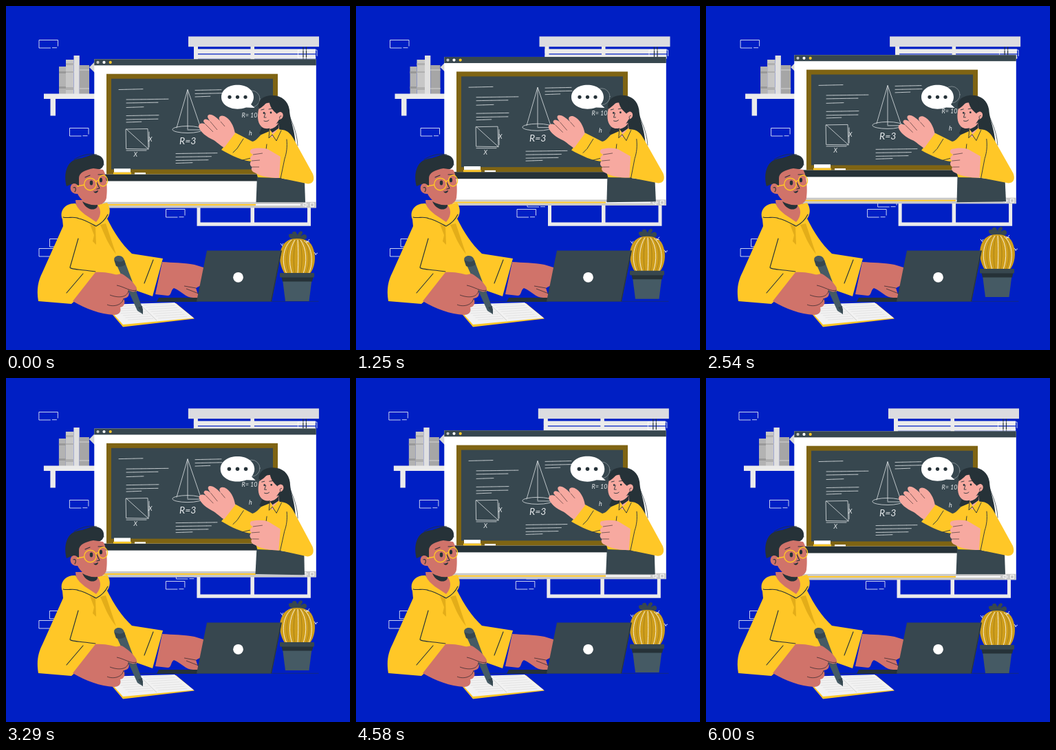
Recreate the animation shown at these times as an HTML page. Size 500 by 500 pixels, loop 6.04 s.

```html
<!DOCTYPE html>
<html lang="en">
<head>
<meta charset="utf-8">
<title>Online lesson</title>
<style>
  html, body { margin: 0; width: 100%; height: 100%; overflow: hidden; background: #001fc4; }
  svg { display: block; width: 100%; height: 100%; }
  .ink { fill: none; stroke: #263238; stroke-linecap: round; stroke-linejoin: round; }
  .chalk { fill: none; stroke: #dfe4e6; stroke-width: .8; stroke-linecap: round; }
  .rough { stroke-dasharray: 7 .7 3 .4; }
  .letters { fill: #e6eaec; font-family: Lato, "Open Sans", sans-serif; font-style: italic; }
  .brick { fill: none; stroke: #fff; stroke-width: .8; }
</style>
</head>
<body>
<svg viewBox="0 0 500 500">
  <rect width="500" height="500" fill="#001fc4"/>

  <g id="room">
    <g fill="#ebebeb">
      <path d="M273 62.500H450V69.200H273ZM273 70.600H450V76.800H273Z"/>
      <path d="M273 59H279V80H273ZM355.500 59H361V80H355.500Z"/>
      <path d="M277.500 270H282.500V314.500H355.500V270H361V314.500H438V270H443V319.800H277.500Z"/>
    </g>
    <path d="M432 59V78M436.500 59V78" class="ink" stroke-width="1.200"/>
    <rect x="265" y="44.300" width="190" height="14.900" fill="#dcdce0"/>
    <g id="bricks"></g>
    <g>
      <path d="M77 88H87V128H77Z" fill="#b3b3b3"/>
      <path d="M77 95H87V98H77ZM77 117H87V120H77Z" fill="#999"/>
      <path d="M87 78H98.500V128H87Z" fill="#c7c7c7"/>
      <path d="M87 83H98.500V86H87ZM87 95H98.500V97H87ZM87 118H98.500V122H87Z" fill="#b0b0b0"/>
      <path d="M98.500 72H106.800V128H98.500Z" fill="#e0e0e0"/>
      <path d="M106.800 86H121V128H106.800Z" fill="#a6a6a6"/>
      <path d="M106.800 92H121V94H106.800ZM106.800 119H121V121H106.800Z" fill="#bdbdbd"/>
      <path d="M121 89L128 82L136 90L130 98Z" fill="#d6d6d6"/>
    </g>
    <path d="M55 127.500H132V135H72V159.500H64.500V135H55Z" fill="#ebebeb"/>
  </g>

  <g id="screen">
    <rect x="128.300" y="77.300" width="322.500" height="216" fill="#fff"/>
    <rect x="128.300" y="77.300" width="322.500" height="9" fill="#37474f"/>
    <circle cx="133.500" cy="81.900" r="2.100" fill="#c7c7c7"/>
    <circle cx="142.500" cy="81.900" r="2.100" fill="#fff"/>
    <circle cx="151.700" cy="81.900" r="2.100" fill="#ffc727"/>
    <rect x="128.300" y="284.800" width="322.500" height="8.500" fill="#c9c9c9"/>
    <rect x="134" y="287.900" width="294" height="2" fill="#fff"/>
    <rect x="134" y="287.900" width="229" height="2" fill="#ffc727"/>
    <path d="M432 287.500H434L436 286V292L434 290.500H432ZM438 287.500V290.500M442.500 286.500H447.500V291.500H442.500Z" fill="none" stroke="#fff" stroke-width=".9"/>
    <rect x="139" y="244.500" width="262" height="10" fill="#263238"/>
    <rect x="146" y="98.700" width="249" height="145.800" fill="#7f6413"/>
    <rect x="153" y="105.700" width="235" height="131.800" fill="#37474f"/>
    <rect x="157" y="236.300" width="24" height="5.500" fill="#fff"/>
    <rect x="156" y="241.800" width="26" height="2.700" fill="#ffc727"/>
    <rect x="187" y="242.200" width="16" height="2.300" fill="#fff"/>
    <g id="notes" class="chalk rough"></g>
    <g class="chalk">
      <path d="M174.500 179L206 178.500L207 208L175 207.500ZM175 179L207 208M175 210H204M208 183V205"/>
      <path d="M248 177L264 121.500L283 177M264 122V179"/>
      <ellipse cx="264" cy="179.500" rx="22" ry="5"/>
      <path d="M264 180H284"/>
      <circle cx="357" cy="135" r="12" opacity=".5"/>
    </g>
    <g class="letters">
      <text x="207" y="196.500" font-size="9">X</text>
      <text x="185.500" y="219" font-size="9">X</text>
      <text x="252" y="200.500" font-size="14">R=3</text>
      <text x="342.500" y="162" font-size="9">R= 10</text>
      <text x="353" y="187.500" font-size="9">h</text>
    </g>
  </g>

  <g id="teacher">
    <path d="M367 149C365 137 374 130 387 130C401 130 410 138 412 151C413 169 421 181 421 207L385 196L368 185C371 180 373 174 373 165Z" fill="#263238"/>
    <path d="M408 149C413 165 423 180 424 203" class="ink" stroke-width=".7"/>
    <path d="M365 246L434 255L435 285.200H363.500Z" fill="#37474f"/>
    <path d="M371 187L390 179L402 180C410 181 415 187 419 195L446 244C449 252 447 258 439 258.500L398 250L366 249L359 226C345 226 327 217 313 209L333 184L358 197C364 196 367 190 371 187Z" fill="#ffc727"/>
    <path d="M384 175L396 170L397 181L387 192L382 184Z" fill="#f7a9a0"/>
    <path d="M383 179C390 178 394 174 396 170L396 178L387 184Z" fill="#263238"/>
    <path d="M368 147C365 158 365 169 371 175C377 181 388 178 393 171L397 165C404 165 405 154 398 154L394 156L388 141C381 139 373 143 368 147Z" fill="#f7a9a0"/>
    <path d="M367 150C373 147 379 141 382 135C383 147 388 152 394 157L398 140L385 131L372 135Z" fill="#263238"/>
    <path d="M383 179L382 192L387 187L393 196L399 181L396 178L388 187Z" fill="#ffc727"/>
    <g class="ink" stroke-width=".9">
      <path d="M383 180L382 192L387 187L393 196L400 181M379 201L378 209M400 160C398 159 397 162 398 164"/>
      <path d="M371 151L375 150M382 150L388 149M377 156L375 162L378 162M375 167C377 168 380 168 382 166"/>
      <path d="M345 193L336 207L330 213M408 194C409 205 408 213 405 222L399 251M344 224L360 220"/>
    </g>
    <circle cx="375" cy="155.500" r="1.400" fill="#263238"/>
    <circle cx="385" cy="155" r="1.400" fill="#263238"/>
    <path d="M333 185C331 174 326 164 317 160C311 158 307 162 312 168C306 162 300 157 295 158C291 160 294 164 297 168C291 163 287 164 287 168L290 172C284 169 280 171 280 175C282 183 291 190 302 195C308 199 313 204 317 206Z" fill="#f7a9a0"/>
    <path d="M399 219L382 209C377 206 365 206 357 208C353 210 355 215 359 216C354 219 354 223 357 225C353 228 355 233 358 234C355 237 358 241 361 242C371 248 384 250 397 250Z" fill="#f7a9a0"/>
    <path d="M297 168L307 180M290 172L301 183M312 168L318 175M359 216L373 214M357 225L369 224M358 234L368 234" fill="none" stroke="#4d3838" stroke-width=".7"/>
  </g>

  <g id="bubble">
    <path d="M336.500 114.800C350 114.800 360 122 360 132.500C360 137 358 140 356 143L361.500 148L349 147.500C330 154 313 145 313 132.500C313 122 323 114.800 336.500 114.800Z" fill="#fff"/>
    <g fill="#263238"><circle cx="325" cy="132.300" r="2.600"/><circle cx="336.500" cy="132.300" r="2.600"/><circle cx="348" cy="132.300" r="2.600"/></g>
  </g>

  <path d="M47 429.300H454" class="ink" stroke-width=".5"/>

  <g id="plant">
    <path d="M423 339C414 340 410 336 411 332C415 330 419 331 421 334C413 331 416 327 421 328L424 333C425 327 431 325 431 330L428 335C434 329 438 333 437 337C434 341 428 340 423 339Z" fill="#37474f"/>
    <path d="M406 390C398 380 396 364 400 353C404 342 412 338 423 338C436 338 444 343 447 354C451 365 449 381 441 390Z" fill="#cf9e1c"/>
    <path d="M408 389C400 374 402 350 415 340M416 389C410 373 412 352 420 340M424 389C425 373 425 354 424 340M432 389C438 373 437 352 428 340M440 389C447 374 446 351 433 341" fill="none" stroke="#fff" stroke-width=".8"/>
    <path d="M412 389C405 372 408 350 417 340M420 389C417 372 418 350 422 340M428 389C431 374 431 352 426 340M436 389C443 373 442 351 431 340" fill="none" stroke="#7f6413" stroke-width=".5"/>
    <path d="M402 349L399 345M401 348L403 345M437 344L441 339M436 342L441 343M449 361L453 359M448 358L451 362" stroke="#fff" stroke-width=".8"/>
    <path d="M401.500 394H445L440.500 429H406Z" fill="#455a64"/>
    <path d="M400 392H447L445 400.500H402Z" fill="#263238"/>
    <rect x="398" y="388" width="50" height="6.500" rx="1" fill="#37474f"/>
  </g>

  <g id="student">
    <path d="M145 437L247 432L274 454.500L170 466.500Z" fill="#ffc727"/>
    <path d="M144 434L245 431L273 453.500L170 463Z" fill="#f2f2f2"/>
    <path d="M194 433L219 457" stroke="#d0d0d0"/>
    <g id="writing" fill="none" stroke="#d9d9d9" stroke-width=".6"></g>

    <path d="M101 282H140V322H105Z" fill="#d0736a"/>
    <path d="M82 310C77 298 86 286 101 287C107 301 122 307 131 314C137 307 140 298 133 289L147 286C153 295 151 304 147 309C157 329 168 346 183 360L228 367L213 422L179 410L145 390L95 433L47 429C44 411 47 399 53 387L83 320Z" fill="#ffc727"/>
    <path d="M122 317L128 333L126 342L131 347L130 320ZM137 318C143 331 147 345 160 361L153 340L145 316Z" fill="#e3ad19"/>
    <g class="ink" stroke-width="1.100">
      <path d="M83 307C91 309 99 305 106 309C115 311 123 316 131 320C139 316 145 309 148 303"/>
      <path d="M105 338L93 380C94 383 108 383 130 386M112 389L88 417M214 369L201 403"/>
    </g>

    <path d="M227 372C242 373 258 373 274 376L287 380V404L276 410L281 425L272 424C261 424 255 414 244 410C239 413 241 421 235 421L217 419Z" fill="#d0736a"/>
    <path d="M276 410L259 407M280 418L262 411" fill="none" stroke="#3b2d31" stroke-width=".8"/>

    <path d="M88 262C84 247 87 231 97 225C105 220 112 222 118 219C127 213 141 216 142 226C143 234 138 238 132 238L110 254L106 264L95 259Z" fill="#263238"/>
    <path d="M112 221C125 215 141 218 142 231M99 223C111 216 122 214 132 216" class="ink" stroke-width=".8"/>
    <path d="M106 250C106 242 116 238 127 236L141 238C146 244 148 265 146 279C144 288 135 290 126 289C116 288 108 281 104 273C96 274 91 266 95 260C99 256 103 259 106 262Z" fill="#d0736a"/>
    <path d="M111 284C118 288 125 290 133 289C134 298 117 299 111 284Z" fill="#263238"/>
    <path d="M98 264C102 262 102 268 100 270M115 249L122 246M134 245L141 245M132 257L136 265L132 266" class="ink" stroke-width="1.100"/>
    <ellipse cx="124" cy="257" rx="2.300" ry="3.400" fill="#263238"/>
    <ellipse cx="138" cy="253" rx="2.100" ry="3.200" fill="#263238"/>
    <path d="M127 269.500C130 270 132 269 134 268C134 271 130 274 127 269.500Z" fill="#263238"/>
    <g fill="none" stroke="#ffc727" stroke-width="1.400">
      <circle cx="122.500" cy="259" r="8.800"/>
      <ellipse cx="141" cy="254" rx="6.500" ry="8"/>
      <path d="M131 256C132 253 134 253 135 255M114 260L103 262"/>
    </g>

    <path d="M130 387C145 386 158 390 168 393L179 402C187 406 191 410 190 415C187 418 182 416 178 414C180 420 178 424 171 425C174 431 172 437 166 438C168 445 164 449 157 449C137 448 116 440 97 429Z" fill="#d0736a"/>
    <path d="M157 368C158 362 168 361 171 367L199 441L199 448L191 443Z" fill="#455a64"/>
    <path d="M157 369C164 373 169 372 172 369L174 376C169 379 164 380 160 378ZM192 438L198 436L199 448Z" fill="#37474f"/>
    <path d="M158 391L168 389C177 394 187 403 190 410C190 417 182 417 176 411L160 407Z" fill="#d0736a"/>
    <path d="M190 413C182 416 172 408 161 406M178 414C176 425 161 424 151 420M171 425C168 437 153 437 147 434" fill="none" stroke="#3b2d31" stroke-width=".8"/>
  </g>

  <g id="laptop">
    <path d="M222 424H279V430H219Z" fill="#263238"/>
    <path d="M292 355.500H401L386 429.500H277Z" fill="#37474f"/>
    <path d="M400 356L385.500 429" class="ink" stroke-width="1"/>
    <circle cx="337.500" cy="394.300" r="7.400" fill="#fff"/>
  </g>
</svg>
<script>
const byId = id => document.getElementById(id);
const lerpKeys = (keys, p) => {
  const i = Math.max(1, keys.findIndex(([at]) => at >= p));
  const [p0, v0] = keys[i - 1], [p1, v1] = keys[i];
  return v0 + (v1 - v0) * (p - p0) / (p1 - p0);
};

// Outlines left open near the lower right corner
byId("bricks").innerHTML = [[48, 49.5], [92.5, 177.5], [232.5, 295.5], [247.5, 280.5], [63.5, 338.5], [48, 352.5], [424.5, 64]]
  .map(([x, y]) => `<path class="brick" d="M${x + 17} ${y + 11.5}H${x}V${y}H${x + 27.5}V${y + 9}M${x + 19} ${y + 11.2}H${x + 26}"/>`).join("");

// Each chalk line: left, y, right
byId("notes").innerHTML = [
  [164, 121, 199], [275, 122, 313], [275, 127, 314], [275, 131.5, 297],
  [175, 135.5, 236], [175, 140.5, 221], [175, 147, 200],
  [175, 159, 222], [175, 164.5, 221], [175, 168.5, 197],
  [247, 214, 307], [247, 219, 299], [247, 224, 294], [247, 228, 271]
].map(([x1, y, x2]) => `<path d="M${x1} ${y + .5}L${x2} ${y - .3}"/>`).join("");

byId("writing").innerHTML = Array.from({ length: 7 }, (_, i) => {
  const x = 156 + i * 3.5, y = 437 + i * 3.2;
  return `<path d="M${x} ${y}l37 -2M${x + 44} ${y - 2.4}l42 -2.5"/>`;
}).join("");

const SHAKE = [[0, 0], [.1, -1], [.2, 2], [.3, -4], [.4, 4], [.5, -4], [.6, 4], [.7, -4], [.8, 2], [.9, -1], [1, 0]];
const FLOAT = [[0, 0], [.5, -10], [1, 0]];
const WIND = [[0, 0], [.25, 1], [.75, -1], [1, 0]];
const BEAT = [[0, 1], [.1, 1.1], [.3, 1], [.4, 1], [.5, 1.1], [.6, 1], [1, 1]];
const LOOP = 6040, STEP = 1000 / 24, LAST_STEP = 144;
const move = (id, value) => byId(id).setAttribute("transform", value);

function draw(ms) {
  const time = Math.min(LAST_STEP, Math.floor((ms % LOOP + 5) / STEP)) * STEP;
  const phase = (time % 1500) / 1500;
  const lift = `translate(0 ${lerpKeys(FLOAT, phase)})`;
  move("room", `translate(${lerpKeys(SHAKE, Math.min(1, time / 6000))} 0)`);
  move("screen", lift);
  move("plant", lift);
  move("teacher", `rotate(${lerpKeys(WIND, phase)} 364 208)`);
  move("bubble", `translate(337 132) scale(${lerpKeys(BEAT, phase)}) translate(-337 -132)`);
}

const start = performance.now();
function tick() {
  draw(performance.now() - start);
  requestAnimationFrame(tick);
}
tick();
</script>
</body>
</html>
```
